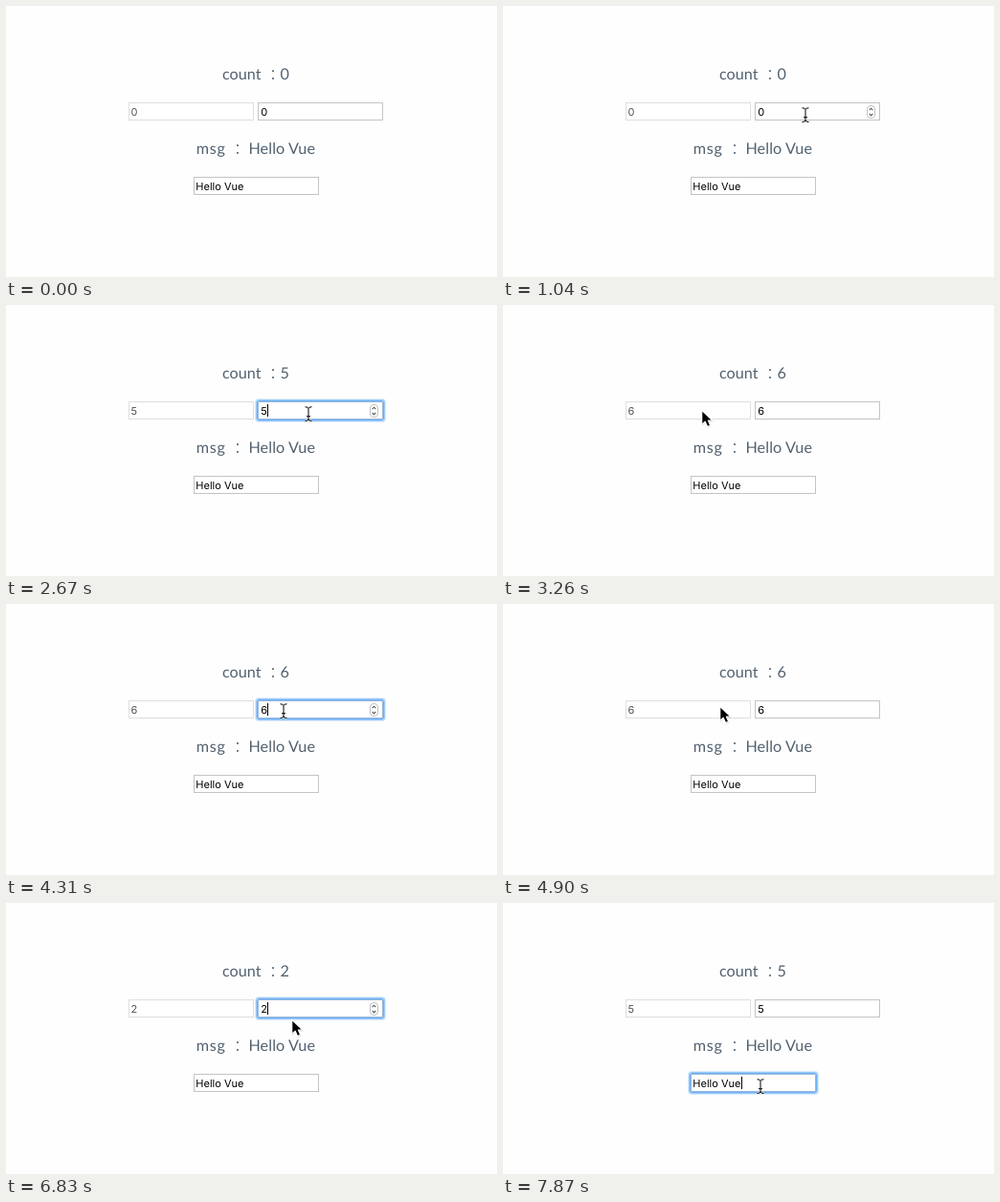
Recreate the animation shown at these times as an HTML page. Size 513 by 284 pixels, loop 8 s.

```html
<!DOCTYPE html>
<html lang="en">
<head>
<meta charset="utf-8">
<title>Two-way binding</title>
<style>
  html, body { margin: 0; width: 100%; height: 100%; overflow: hidden; background: #fefefe; }
  svg { display: block; width: 513px; height: 284px; }
  .head { font: 16.2px Lato, "Open Sans", sans-serif; fill: #52616f; text-rendering: geometricPrecision; }
  .colon { font: 300 14px "Noto Sans CJK JP", "Noto Sans CJK SC", "Noto Sans CJK", sans-serif; fill: #52616f; text-anchor: middle; }
  .field { font: 11px Inter, Roboto, sans-serif; fill: #000; text-rendering: geometricPrecision; }
  .off { fill: #545454; }
  .box { fill: #fff; stroke: #c4c4c4; }
  .ring rect { fill: none; stroke: #5ea9f7; }
  .spin { fill: none; stroke: #555; stroke-width: 1.1; }
</style>
</head>
<body>
<svg viewBox="0 0 513 284">
  <defs>
    <g id="ring" class="ring">
      <rect x="-2.5" y="-2.5" width="136" height="24" rx="3" stroke-opacity=".22"/>
      <rect x="-1.5" y="-1.5" width="134" height="22" rx="2" stroke-opacity=".6"/>
      <rect x="-.5" y="-.5" width="132" height="20" rx="1" stroke-opacity=".9"/>
      <rect x=".5" y=".5" width="130" height="18" stroke-opacity=".4"/>
    </g>
    <path id="beamLine" d="M-3.5-7.2Q-.3-7.2 0-5.5Q.3-7.2 3.5-7.2M0-5.5V6M-3.5 7.5Q-.3 7.5 0 5.8Q.3 7.5 3.5 7.5M-2 2.7H2"/>
  </defs>

  <text class="head" x="226" y="77">count</text>
  <text class="colon" x="279" y="77">：</text>
  <text class="head" id="count" x="286.6" y="77">0</text>
  <text class="head" x="198.8" y="155" letter-spacing=".7">msg</text>
  <text class="colon" x="242" y="155">：</text>
  <text class="head" x="253.4" y="155" letter-spacing=".1">Hello Vue</text>

  <rect class="box" x="128.5" y="101.5" width="130" height="18" style="stroke:#dedede"/>
  <rect id="mark" x="131" y="104" width="7" height="13" fill="#b3d7ff"/>
  <text class="field off" id="copy" x="130.6" y="115">0</text>

  <rect class="box" x="263.5" y="101.5" width="130" height="18"/>
  <use id="numRing" href="#ring" x="263" y="101"/>
  <text class="field" id="num" x="266.3" y="115">0</text>
  <rect id="numCaret" x="273" y="104" width="1" height="13"/>
  <g id="spin" class="spin">
    <rect x="380.5" y="104.5" width="8" height="13" rx="3.5" fill="#fff" stroke="#c0c0c0" stroke-width="1"/>
    <path d="M382.7 109.2l1.8-2 1.8 2M382.7 112.9l1.8 2 1.8-2"/>
  </g>

  <rect class="box" x="196.5" y="179.5" width="130" height="18"/>
  <use id="msgRing" href="#ring" x="196" y="179"/>
  <text class="field" x="198.3" y="193">Hello Vue</text>
  <rect id="msgCaret" x="249" y="182" width="1" height="13"/>

  <g id="arrow">
    <path d="M.9 2.4V17.6l3.7-3.2 2.3 5.3 3.4-1.5-2.2-5h4.8z" fill="#000" opacity=".2"/>
    <path d="M.7 1.2V16.4l3.5-3.2 2.3 5.4 3.2-1.4-2.3-5.2h4.6z" fill="#000" stroke="#fff" stroke-width="1.2" stroke-linejoin="round"/>
  </g>
  <g id="beam" fill="none">
    <use href="#beamLine" stroke="#fff" stroke-width="2.4" stroke-opacity=".7"/>
    <use href="#beamLine" stroke="#000"/>
  </g>
</svg>
<script>
const LOOP = 8000;
const $ = id => document.getElementById(id);
const arrow = (x, y) => ({ arrow: [x, y], beam: null });
const beam = (x, y) => ({ arrow: null, beam: [x, y] });
const value = n => ({ n, caret: true });
const onNum = { focus: 'num', caret: true };
const blur = { focus: '', hover: false };

// Each step changes part of the state and holds until the next one.
const steps = [
  [0, { n: 0, focus: '', hover: false, caret: true, mark: false, arrow: null, beam: null }],
  [450, arrow(361, 166)],
  [590, arrow(333, 139)],
  [740, arrow(315, 122)],
  [1040, { ...beam(316, 114), hover: true }],
  [1180, onNum],
  [1630, { caret: false }],
  [1930, value(1)],
  [2070, value(2)],
  [2220, value(3)],
  [2520, value(4)],
  [2670, value(5)],
  [2820, value(6)],
  [2960, beam(277, 112)],
  [3110, arrow(222, 109)],
  [3260, { ...arrow(207, 109), ...blur }],
  [3560, { mark: true }],
  [4010, arrow(232, 109)],
  [4160, { ...beam(290, 112), hover: true }],
  [4300, { ...onNum, mark: false }],
  [4450, beam(302, 112)],
  [4600, beam(275, 112)],
  [4750, arrow(236, 107)],
  [4900, { ...arrow(226, 106), ...blur }],
  [5350, { ...beam(310, 113), hover: true }],
  [5500, onNum],
  [5800, value(5)],
  [5950, { caret: false }],
  [6100, value(4)],
  [6240, value(3)],
  [6390, value(2)],
  [6540, beam(306, 116)],
  [6680, arrow(300, 120)],
  [6830, arrow(298, 121)],
  [6980, value(3)],
  [7130, value(4)],
  [7280, value(5)],
  [7430, arrow(285, 156)],
  [7580, beam(269, 192)],
  [7870, { focus: 'msg', hover: false, caret: true }]
];

const show = (id, on) => $(id).setAttribute('visibility', on ? 'visible' : 'hidden');

function place(id, at) {
  show(id, at);
  if (at) $(id).setAttribute('transform', `translate(${at})`);
}

function draw(t) {
  const s = Object.assign({}, ...steps.filter(([at]) => at <= t).map(([, change]) => change));
  for (const id of ['count', 'copy', 'num']) $(id).textContent = s.n;
  const inNum = s.focus === 'num', inMsg = s.focus === 'msg';
  show('mark', s.mark);
  show('numRing', inNum);
  show('msgRing', inMsg);
  show('spin', inNum || s.hover);
  show('numCaret', inNum && s.caret);
  show('msgCaret', inMsg && s.caret);
  $('numCaret').setAttribute('x', s.n === 1 ? 271 : 273);
  place('arrow', s.arrow);
  place('beam', s.beam);
}

const start = performance.now();
let last = -1;
function tick() {
  const t = (performance.now() - start) % LOOP;
  const step = steps.findLastIndex(([at]) => at <= t);
  if (step !== last) draw(t);
  last = step;
  requestAnimationFrame(tick);
}
draw(0);
requestAnimationFrame(tick);
</script>
</body>
</html>
```
